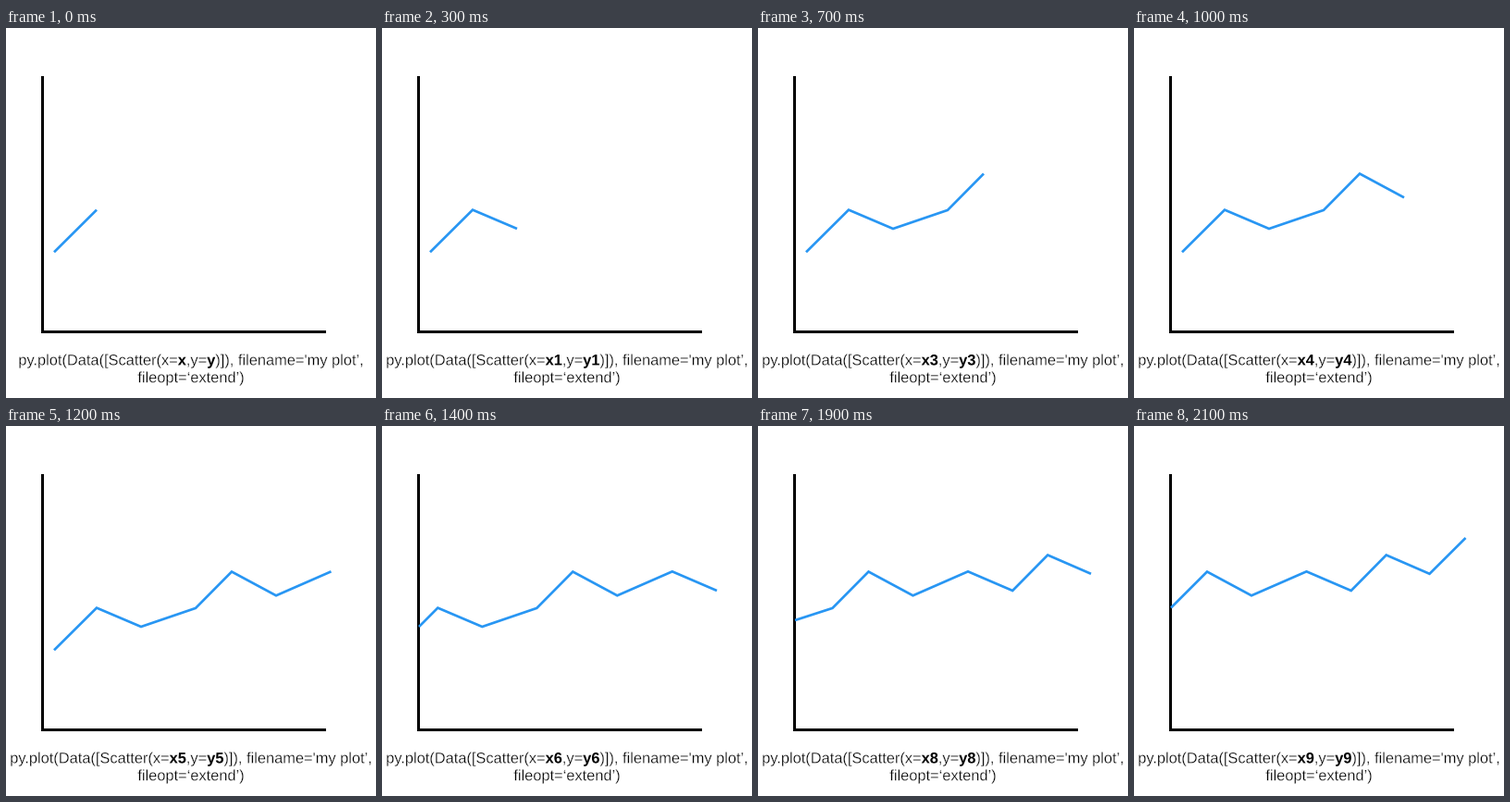
These frames come from a looping animation (400 by 400 pixels, 2.4 s). A matplotlib script:

```python
import numpy as np
import matplotlib.pyplot as plt
from matplotlib.animation import FuncAnimation
from matplotlib.patches import PathPatch, Rectangle
from matplotlib.path import Path
from matplotlib.textpath import TextPath

SIZE, DPI, TICK = 400, 100, 100
PX = 72 / DPI
FONT_SIZE = 16.4
BLUE = "#2896f3"
AXIS_X = 40

POINTS = np.array([
    (52, 242.3), (98, 196.6), (146, 217), (205, 196.9), (244, 157.5),
    (292, 183.3), (351.5, 157.3), (399.7, 178), (437.7, 139.5),
    (484.5, 159.8), (523.5, 121),
])
# Step -> (scroll distance, height where the line meets the axis)
SCROLL = {6: (37.7, 217), 7: (85.5, 196), 8: (124.5, 210), 9: (165, 196.5)}
HOLDS = [3, 2, 2, 3, 2, 2, 3, 2, 2, 3]
STEPS = np.repeat(np.arange(len(HOLDS)), HOLDS)


def glyphs(text, weight):
    font = {"family": "Liberation Sans", "weight": weight}
    return TextPath((0, 0), text, size=FONT_SIZE, prop=font)


def advance(text, weight):
    right = [glyphs(s, weight).get_extents().x1 for s in (text + "|", "|")]
    return right[0] - right[1]


def layout(runs, baseline):
    """Centre a line of (text, weight) runs; return one path per weight."""
    widths = [advance(*run) for run in runs]
    x = SIZE / 2 - sum(widths) / 2
    parts = {"normal": [], "bold": []}
    for (text, weight), width in zip(runs, widths):
        path = glyphs(text, weight)
        parts[weight].append(Path(path.vertices * [1, -1] + [x, baseline], path.codes))
        x += width
    return parts


def caption(step):
    n = str(step) if step else ""
    first = layout([
        ("py.plot(Data([Scatter(x=", "normal"), ("x" + n, "bold"),
        (",y=", "normal"), ("y" + n, "bold"),
        (")]), filename='my plot’,", "normal"),
    ], 364.4)
    second = layout([("fileopt=‘extend’)", "normal")], 383.2)
    return {w: Path.make_compound_path(*first[w], *second[w]) for w in first}


def curve(step):
    points = POINTS[:step + 2]
    if step in SCROLL:
        shift, entry = SCROLL[step]
        points = points - [shift, 0]
        points = np.vstack([(AXIS_X, entry), points[points[:, 0] > AXIS_X + 1]])
    return points


fig = plt.figure(figsize=(SIZE / DPI, SIZE / DPI), dpi=DPI, facecolor="white")
ax = fig.add_axes([0, 0, 1, 1])
ax.set(xlim=(0, SIZE), ylim=(SIZE, 0))
ax.axis("off")

ax.add_patch(Rectangle((38, 52), 3, 278, color="black", lw=0))
ax.add_patch(Rectangle((38, 327), 308, 3, color="black", lw=0))
line, = ax.plot([], [], color=BLUE, lw=2.7 * PX, solid_capstyle="butt",
                solid_joinstyle="miter", zorder=3)

captions = [caption(step) for step in range(len(HOLDS))]
# A fine white outline thins the regular weight to a light one.
light = PathPatch(captions[0]["normal"], fc="black", ec="white", lw=0.32 * PX, zorder=4)
bold = PathPatch(captions[0]["bold"], fc="black", lw=0, zorder=5)
ax.add_patch(light)
ax.add_patch(bold)


def update(frame):
    step = int(STEPS[frame])
    line.set_data(*curve(step).T)
    light.set_path(captions[step]["normal"])
    bold.set_path(captions[step]["bold"])
    return line, light, bold


anim = FuncAnimation(fig, update, frames=len(STEPS), interval=TICK,
                     repeat=True, repeat_delay=0)
plt.show()
```
